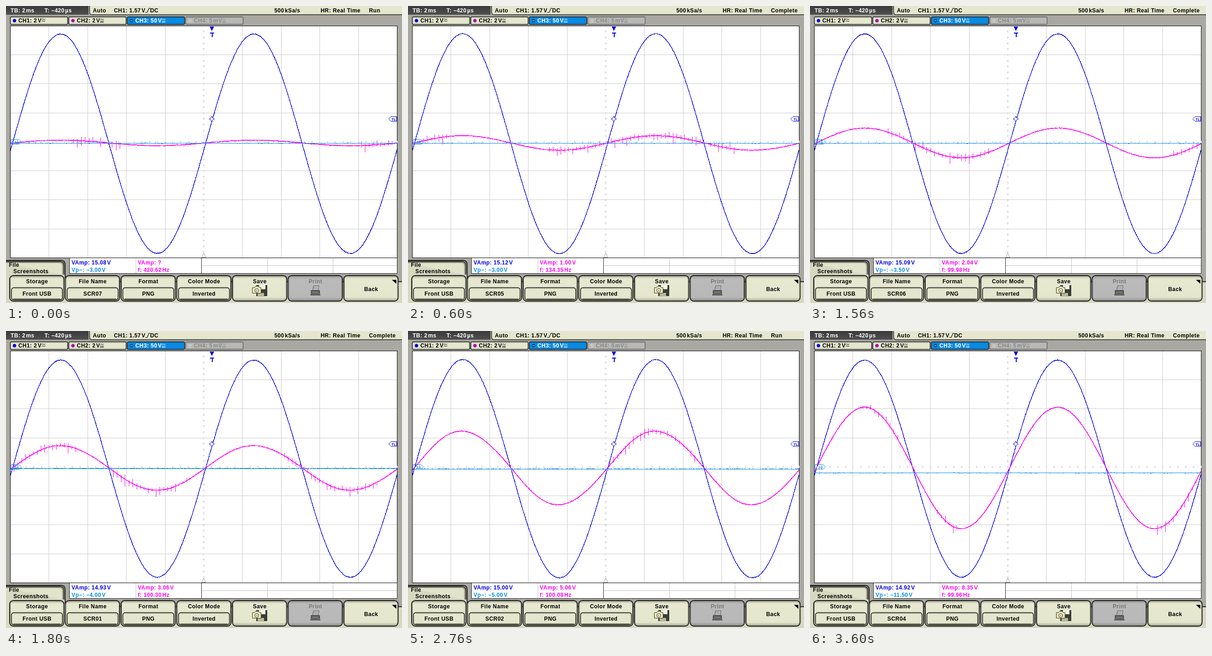
Animation of 864x648 px, one loop 4.2 s. Source, as an HTML page:

```html
<!DOCTYPE html>
<html lang="en">
<head>
<meta charset="utf-8">
<title>Oscilloscope</title>
<style>
html, body { margin: 0; width: 100%; height: 100%; overflow: hidden; background: #a9a8a2; }
svg { display: block; width: 864px; height: 648px; }
text { font: bold 12px "Liberation Sans", Arial, sans-serif; letter-spacing: .45px; white-space: pre; }
.small { font-size: 8px; letter-spacing: 0; }
</style>
</head>
<body>
<svg id="scope" viewBox="0 0 864 648">
  <defs>
    <linearGradient id="key" x2="0" y2="1">
      <stop offset="0" stop-color="#a3a593"/><stop offset=".12" stop-color="#e6e8d0"/>
      <stop offset=".85" stop-color="#e4e6cd"/><stop offset="1" stop-color="#a3a593"/>
    </linearGradient>
    <linearGradient id="off" x2="0" y2="1">
      <stop offset="0" stop-color="#909090"/><stop offset=".12" stop-color="#bababa"/>
      <stop offset=".85" stop-color="#b8b8b8"/><stop offset="1" stop-color="#888"/>
    </linearGradient>
    <linearGradient id="dark" x2="0" y2="1">
      <stop offset="0" stop-color="#3a3a3a"/><stop offset="1" stop-color="#505050"/>
    </linearGradient>
    <clipPath id="plot"><rect x="10" y="45" width="843" height="504"/></clipPath>
  </defs>
</svg>
<script>
const NS = 'http://www.w3.org/2000/svg';
const svg = document.getElementById('scope');
const BLUE = '#0000e6', PINK = '#ff00f0', SKY = '#0a8ae0', BEIGE = '#e4e6cd';
const STEP = 600, PERIOD = 421.5, PEAK = 119.3;
const LEFT = 9.5, TOP = 43.2, DIV_X = 84.4, DIV_Y = 63.3, MID_Y = 296.5;
const VOLT = 15.87; // pixels per volt on the first two channels

function add(parent, tag, attrs) {
  const el = document.createElementNS(NS, tag);
  for (const k in attrs) el.setAttribute(k, attrs[k]);
  return parent.appendChild(el);
}
const rect = (p, x, y, width, height, fill, more) => add(p, 'rect', { x, y, width, height, fill, ...more });
const path = (p, d, stroke, width = 1, fill = 'none', more) =>
  add(p, 'path', { d, stroke, 'stroke-width': width, fill, ...more });
const crisp = { 'shape-rendering': 'crispEdges' };

// An underscore stands for a thin gap before a unit.
function label(p, x, y, s, fill = '#000', more = {}) {
  const t = add(p, 'text', { x, y, fill, ...more });
  s.split('_').forEach((part, i) => {
    add(t, 'tspan', i ? { dx: 1.5 } : {}).textContent = part;
  });
  return t;
}
const centred = (p, x, y, s, fill) => label(p, x, y, s, fill, { 'text-anchor': 'middle' });

function random(seed) {
  return () => {
    seed = (seed * 16807) % 2147483647;
    return seed / 2147483647;
  };
}

function coupling(x, y, colour, wavy) {
  const tilde = dy => `M${x} ${y + dy}q2 -3 4 -1t4 -1`;
  path(svg, tilde(-1) + (wavy ? tilde(3) : `M${x} ${y + 2}h8m-8 2.5h8`), colour);
}

function drawHeader() {
  rect(svg, 0, 0, 864, 648, '#a9a8a2');
  rect(svg, 0, 0, 180, 19, 'url(#dark)');
  path(svg, 'M182.5 -2V13Q182.5 19 188 19H866V-2Z', '#222', 1.3, BEIGE);
  label(svg, 10, 14, 'TB: 2_ms', '#fff');
  label(svg, 84, 14, 'T: −420_µs', '#fff');
  label(svg, 189.5, 14, 'Auto');
  label(svg, 235.5, 14, 'CH1: 1.57_V');
  path(svg, 'M304 14h4l4 -9h3', '#000', 1.2);
  label(svg, 314.5, 14, 'DC');
  label(svg, 585.5, 14, '500_kSa/s');
  label(svg, 686.5, 14, 'HR: Real Time');

  const tabs = [
    ['CH1: 2_V', BEIGE, '#000', '#0000d0'],
    ['CH2: 2_V', BEIGE, '#000', '#b000b0'],
    ['CH3: 50_V', SKY, '#fff', '#084a80'],
    ['CH4: 5_mV', '#b8b8b6', '#888', '#d8d8d8']
  ];
  tabs.forEach(([name, fill, ink, dot], i) => {
    const x = 9 + i * 127.6;
    rect(svg, x + .5, 23.5, 125, 17, fill, { rx: 3, stroke: i < 3 ? '#222' : '#666', 'stroke-width': 1.6 });
    path(svg, `M${x + 3} 25.2h120m0 13.6h-120`, 'rgba(0,0,0,.25)');
    if (i < 3) add(svg, 'circle', { cx: x + 9.5, cy: 32, r: 3.7, fill: dot });
    if (i === 2) path(svg, `M${x + 7} 32h5`, '#5bbcff', 1.5);
    if (i === 3) path(svg, `M${x + 6} 30.5h7m-7 4h7`, dot, 1.5);
    const t = label(svg, x + 18, 36, name, ink);
    coupling(x + 19.5 + t.getComputedTextLength(), 31, ink, i === 0);
  });
}

function drawGrid() {
  rect(svg, 9.5, 43.5, 844, 506, '#fff', { stroke: '#000' });
  const cols = i => Math.floor(LEFT + i * DIV_X) + .5;
  const rows = i => Math.floor(TOP + i * DIV_Y) + .5;
  let d = '', ticks = '';
  for (let i = 1; i < 10; i++) if (i !== 5) d += `M${cols(i)} 44V549`;
  for (let i = 1; i < 8; i++) if (i !== 4) d += `M10 ${rows(i)}H853`;
  for (let i = .2; i < 10; i += .2) ticks += `M${cols(i)} 294v5m-2 -2.5h4`;
  for (let i = .2; i < 8; i += .2) ticks += `M429 ${rows(i)}h5m-2.5 -3v6`;
  path(svg, d, '#cbcbcb', 1, 'none', crisp);
  path(svg, ticks, '#cfcfcf', 1, 'none', crisp);
  path(svg, 'M431.5 539L436 548.5H427Z', '#999', 1, '#fff');
}

function drawMarkers() {
  path(svg, 'M444.5 45H454L449.2 54.5Z', 'none', 0, BLUE);
  path(svg, 'M445 58.8H454M449.5 58V67.5', BLUE, 2, 'none', crisp);
  path(svg, 'M449 240.5l2 4l4 2l-4 2l-2 4l-2 -4l-4 -2l4 -2Z', BLUE, 1, '#fff');
  path(svg, 'M835 246.5l5 -5h12.5v10h-12.5Z', BLUE, 1, '#fff');
  label(svg, 841, 250, 'TL', BLUE, { class: 'small' });
  path(svg, 'M34 296.5l-5.5 -5h-17v10h17Z', SKY);
  label(svg, 18, 299.5, '3', SKY, { class: 'small' });
  path(svg, 'M25.5 293.5v4m-2.5 .5h5m-4 2h3', SKY);
}

function drawIcons() {
  // camera in front of a disk
  rect(svg, 546, 609, 24, 24, '#3c3c36');
  rect(svg, 552, 609, 14, 9, '#f2f2ea');
  rect(svg, 549, 626, 14, 8, '#b9b79c');
  path(svg, 'M537.5 614.5h5l2 -3h6l2 3h4v12h-19Z', '#333', 1, '#efe9a8');
  add(svg, 'circle', { cx: 547, cy: 620.5, r: 4, fill: '#fff', stroke: '#333', 'stroke-width': 1.2 });
  add(svg, 'circle', { cx: 547, cy: 620.5, r: 1.6, fill: '#888' });
  // printer
  path(svg, 'M669 620l2 -9.5h12l-2 9.5Z', '#555', 1, '#c8c8c8');
  path(svg, 'M671 613.5h9m-9.5 3h9', '#777');
  rect(svg, 665, 620, 20, 8, '#555');
  path(svg, 'M664 630h22', '#444', 2.5);
  path(svg, 'M668 624.5h14', '#bbb');
}

function drawMenu() {
  rect(svg, 138, 550, 715.5, 33.5, '#fff');
  path(svg, 'M283.5 550V583M426 566.5H853M570.5 550V583M713.5 550V583', '#c2c2c2', 1, 'none', crisp);
  path(svg, 'M138.5 550V583.5H853.5V550M426.5 550V583', '#222', 1, 'none', crisp);
  path(svg, 'M-2 555H120Q129 555 129 565V590Q129 601.5 138 601.5H866V650H-2Z', '#222', 2, '#d6d8c0');
  path(svg, 'M-2 557.5H118Q126 557.5 126 566V586', '#45463d', 3);
  path(svg, 'M-2 560H117Q123.5 560 123.5 567V586', '#a3a593', 2, '#e1e3ca');

  const keys = [['Storage', 'Front USB'], ['File Name', ' '], ['Format', 'PNG'],
    ['Color Mode', 'Inverted'], ['Save'], ['Print'], ['Back']];
  keys.forEach(([name, value], i) => {
    const x = 8 + i * 121.5, mid = x + 59.7, off = name === 'Print';
    rect(svg, x, 588, 118.5, 56, off ? 'url(#off)' : 'url(#key)', { rx: 8, stroke: '#222', 'stroke-width': 2 });
    rect(svg, x + 1.5, 589.5, 115.5, 53, 'none', { rx: 7, stroke: off ? '#808080' : '#8f907f' });
    centred(svg, mid, name === 'Back' ? 622 : 605, name, off ? '#777' : '#000');
    if (value) {
      rect(svg, x + 4, 614.5, 111, 26.5, BEIGE, { rx: 5, stroke: '#111', 'stroke-width': 1.5 });
      path(svg, `M${x + 8} 639.3h103`, '#5c5d50', 2);
      path(svg, `M${x + 8} 616.3h103`, '#a3a593');
      centred(svg, mid, 632, value);
    }
  });
  path(svg, 'M842 597.5H851.5V606Z', 'none', 0, '#000');
  label(svg, 6.5, 569, 'File');
  label(svg, 16, 583, 'Screenshots');
  drawIcons();
}

// skew moves the peaks sideways while the zero crossings stay put
function wave(mid, amp, skew = 0) {
  const s = skew * Math.PI / PERIOD;
  return x => {
    const a = (x - PEAK) * 2 * Math.PI / PERIOD;
    return mid - amp * Math.cos(a) * (1 + s * Math.sin(2 * a));
  };
}

function trace(p, f, colour, width, noise, rnd) {
  let d = '';
  for (let x = 9; x <= 854; x++) {
    d += `${d ? 'L' : 'M'}${x} ${(f(x) + (rnd() - .5) * noise).toFixed(1)}`;
  }
  path(p, d, colour, width, 'none', { 'stroke-linejoin': 'round', ...crisp });
}

// Evenly spaced spikes inside each noisy stretch, a few of them long.
function spikes(p, f, stretches, rnd) {
  let d = '';
  for (const [from, to] of stretches) {
    for (let x = from; x <= to; x += PERIOD / 50) {
      const up = 3 + 7 * rnd() ** 2, down = 3 + 13 * rnd() ** 3;
      d += `M${Math.round(x) + .5} ${Math.round(f(x) - up)}V${Math.round(f(x) + down)}`;
    }
  }
  path(p, d, PINK, 1, 'none', crisp);
}

// v1, vp, v2 are the readings in volts; the traces follow from them.
const shots = [
  { file: 7, v1: 15.08, vp: 3, v2: 0, hz: '420.62', run: true, noisy: [[147, 256], [775, 845]] },
  { file: 5, v1: 15.12, vp: 3, v2: 1, hz: '134.35', noisy: [[33, 92], [308, 652], [660, 716]] },
  { file: 6, v1: 15.09, vp: 3.5, v2: 2.04, hz: '99.98', noisy: [[170, 396], [793, 850]] },
  { file: 1, v1: 14.93, vp: 4, v2: 3.06, hz: '100.30', skew: -1.5, noisy: [[17, 152], [234, 400], [607, 812]] },
  { file: 2, v1: 15, vp: 5, v2: 5.06, hz: '100.08', skew: -3, run: true, noisy: [[440, 630]] },
  { file: 3, v1: 14.92, vp: 6.5, v2: 7.04, hz: '100.06', skew: -6.3, line: true, noisy: [[26, 236], [672, 850]] },
  { file: 4, v1: 14.92, vp: 11.5, v2: 8.35, hz: '99.96', noisy: [[115, 198], [278, 328], [758, 850]] }
];

function drawShot(s, i) {
  const g = add(svg, 'g', { visibility: 'hidden' });
  const plot = add(g, 'g', { 'clip-path': 'url(#plot)' });
  const rnd = random(4021 + i * 7919);
  const pink = wave(298.8, (s.v2 || .38) * VOLT, s.skew);
  const sky = Math.max(299.5, MID_Y + (s.vp - 1.2) * DIV_Y / 50);
  if (s.line) path(plot, 'M449.5 54V549', BLUE, 1, 'none', { 'stroke-dasharray': '12 5', ...crisp });
  trace(plot, wave(300.4, s.v1 * VOLT), BLUE, 1.4, 1.5, rnd);
  trace(plot, pink, PINK, 1.7, 1, rnd);
  spikes(plot, pink, s.noisy, rnd);
  trace(plot, () => sky, SKY, 1.4, .9, rnd);

  label(g, 792, 14, s.run ? 'Run' : 'Complete');
  label(g, 143, 564, `VAmp: ${s.v1.toFixed(2)}_V`, BLUE);
  label(g, 143, 580, `Vp−: −${s.vp.toFixed(2)}_V`, SKY);
  label(g, 287.5, 564, 'VAmp: ' + (s.v2 ? s.v2.toFixed(2) + '_V' : '?'), PINK);
  label(g, 287.5, 580, `f: ${s.hz}_Hz`, PINK);
  centred(g, 189.2, 632, 'SCR0' + s.file);
  return g;
}

drawHeader();
drawGrid();
drawMenu();
const views = shots.map(drawShot);
drawMarkers();

let shown = -1;
const start = performance.now();
function tick() {
  const now = Math.floor((performance.now() - start) / STEP) % views.length;
  if (now !== shown) {
    shown = now;
    views.forEach((g, i) => g.setAttribute('visibility', i === now ? 'visible' : 'hidden'));
  }
  requestAnimationFrame(tick);
}
tick();
</script>
</body>
</html>
```
